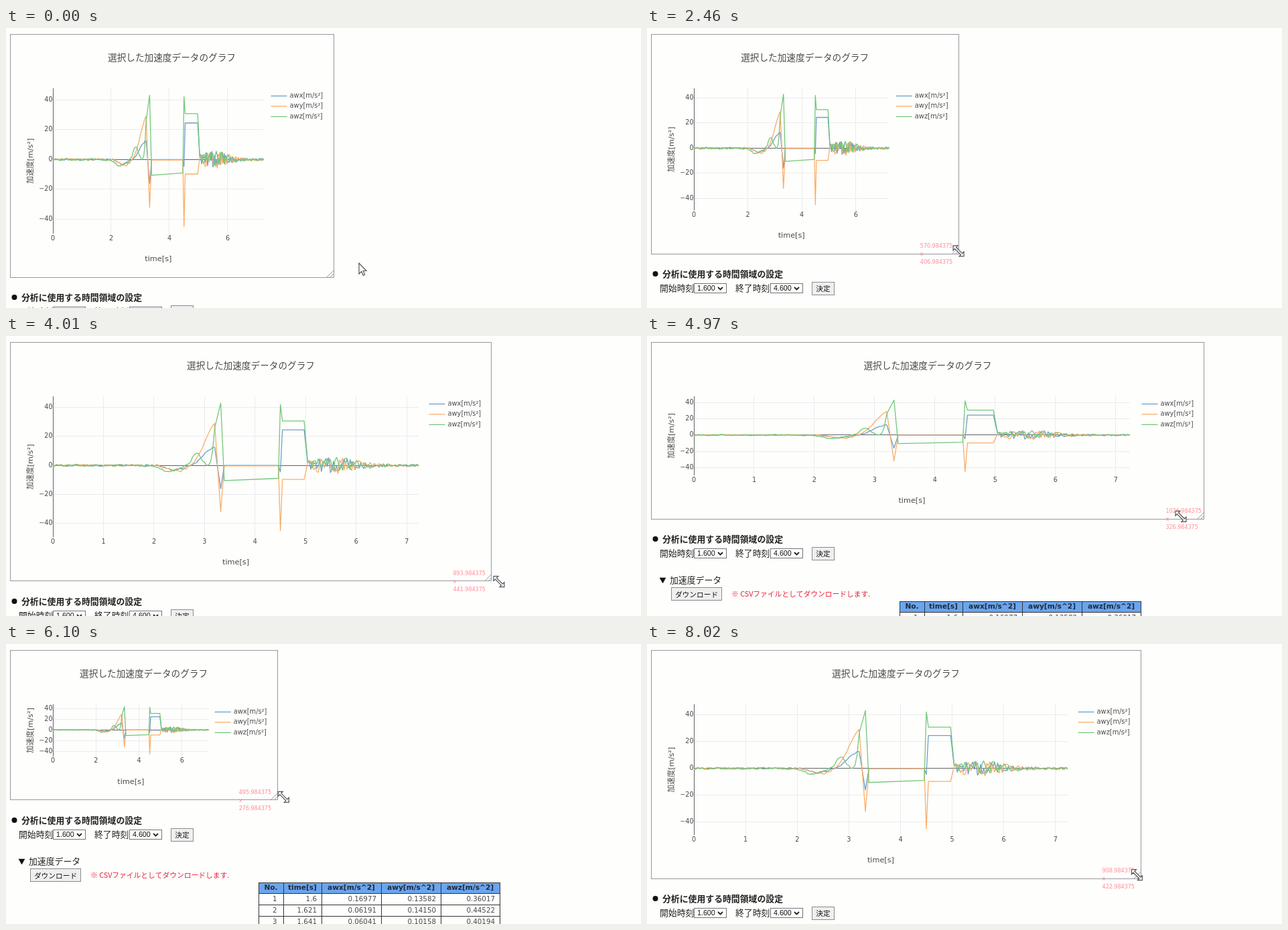
These frames come from a looping animation (948x418 px, 8070 ms). An HTML page with a canvas:

```html
<!DOCTYPE html>
<html lang="ja">
<head>
<meta charset="utf-8">
<title>加速度データ</title>
<style>
html, body { margin: 0; width: 100%; height: 100%; overflow: hidden; background: #fefefc; }
canvas { display: block; }
</style>
</head>
<body>
<canvas id="stage" width="948" height="418"></canvas>
<script>
const ctx = document.getElementById('stage').getContext('2d');
const LOOP = 8070, STEPS = 151;
const GRAB = 17, LEAD = 0.8; // step where the drag begins, steps the pointer runs ahead
const JP = '"Noto Sans CJK JP", "Noto Sans CJK", sans-serif';
const LATIN = '"DejaVu Sans", "Noto Sans CJK JP", sans-serif';
const UI = '"Liberation Sans", "Noto Sans CJK JP", sans-serif';
const INK = '#4a4a4c', GRID = '#ebebf1', EDGE = '#98989f', AXIS = '#626268', PAPER = '#fefefc';
const T_MAX = 7.235, V_TOP = 47.7, V_RANGE = 97.3;

// Turning points of the dragged corner: step, position
const rightTurns = [[GRAB, 489], [46, 465.3], [58, 900], [68, 649.5], [88, 926],
  [107, 343], [136, 797], [151, 736.4]];
const bottomTurns = [[GRAB, 372], [46, 337.4], [58, 390], [68, 331], [82, 400],
  [92, 272.5], [103, 300], [114, 232.9], [138, 385], [151, 349.7]];

const ease = u => (1 - Math.cos(Math.PI * u)) / 2;

function swing(turns, step) {
  if (step <= GRAB) return turns[0][1];
  const i = turns.findIndex(([s]) => s >= step);
  const [s0, v0] = turns[i - 1], [s1, v1] = turns[i];
  return v0 + (v1 - v0) * ease((step - s0) / (s1 - s0));
}

const bump = (x, centre, width) => Math.exp(-(((x - centre) / width) ** 2));

// A slow swell, a crash, a rest, a hit held for a moment, then a rattle
function series(seed, swell, crash, rest, hit, hold) {
  const rand = () => (seed = (seed * 16807) % 2147483647) / 2147483647 * 2 - 1;
  const out = [];
  for (let x = 0; x < 3.2; x += 0.04) out.push([x, swell(x) + rand() * 0.7]);
  out.push([3.2, swell(3.2)], [3.32, crash], [3.39, rest], [4.46, rest * 0.85],
    [4.5, hit], [4.54, hold], [4.97, hold]);
  for (let x = 5.04; x < T_MAX; x += 0.03)
    out.push([x, rand() * (0.8 + 5 * bump(x, 5.55, 0.6))]);
  return out;
}

const curves = [
  { name: 'awx', color: '#6f9fc4',
    points: series(71, x => 12.5 * bump(x, 3.2, 0.28) - 3 * bump(x, 2.4, 0.25), -16, 0, -4.5, 24.5) },
  { name: 'awy', color: '#fbad6a',
    points: series(925, x => 29.7 * bump(x, 3.25, 0.32) - 4 * bump(x, 2.5, 0.25), -32, -0.3, -45, -9.7) },
  { name: 'awz', color: '#74c67a',
    points: series(4403, x => 8.5 * bump(x, 2.84, 0.12) + 29 * bump(x, 3.22, 0.06)
      - 4 * bump(x, 2.3, 0.25), 43, -10.5, 42, 30.7) }
];

const rows = ['0.16977 0.13582 0.36017', '0.06191 0.14150 0.44522', '0.06041 0.10158 0.40194']
  .map((s, i) => [i + 1, +(1.6 + i * 0.0206).toFixed(3), ...s.split(' ')]);

function text(s, x, y, size, { font = LATIN, color = INK, align = 'left', weight = '' } = {}) {
  ctx.font = `${weight} ${size}px ${font}`;
  ctx.fillStyle = color;
  ctx.textAlign = align;
  ctx.textBaseline = 'middle';
  ctx.fillText(s, x, y);
}

function path(points, color, width = 1, fill) {
  ctx.beginPath();
  points.forEach(([x, y]) => ctx.lineTo(x, y));
  if (fill) {
    ctx.closePath();
    ctx.fillStyle = fill;
    ctx.fill();
  }
  ctx.strokeStyle = color;
  ctx.lineWidth = width;
  ctx.stroke();
}

const crisp = v => Math.floor(v) + 0.5;
const hLine = (x0, x1, y, color) => path([[x0, crisp(y)], [x1, crisp(y)]], color);
const vLine = (x, y0, y1, color) => path([[crisp(x), y0], [crisp(x), y1]], color);

function box(x, y, w, h, fill, stroke) {
  ctx.fillStyle = fill;
  ctx.fillRect(x, y, w, h);
  ctx.strokeStyle = stroke;
  ctx.lineWidth = 1;
  ctx.strokeRect(crisp(x), crisp(y), w - 1, h - 1);
}

function drawChart(right, bottom) {
  const left = 70, top = 90, w = (right - 168) / 1.02, h = bottom - 65 - top;
  const px = x => left + x / T_MAX * w;
  const py = v => top + (V_TOP - v) / V_RANGE * h;
  ctx.strokeStyle = EDGE;
  ctx.lineWidth = 1;
  ctx.strokeRect(6.5, 9.5, crisp(right) - 6.5, crisp(bottom) - 9.5);
  text('選択した加速度データのグラフ', (6 + right) / 2, 44, 13.65, { font: JP, align: 'center' });

  const gap = w < 498 ? 2 : 1;
  for (let x = 0; x < T_MAX; x += gap) {
    if (x) vLine(px(x), top, top + h, GRID);
    text(x, px(x), bottom - 58, 9.65, { align: 'center' });
  }
  for (let v = -40; v <= 40; v += 20) {
    if (v) hLine(left, left + w, py(v), GRID);
    text(`${v}`.replace('-', '−'), 69.5, py(v), 9.65, { align: 'right' });
  }
  vLine(left, top, top + h, AXIS);
  hLine(left, left + w, py(0), AXIS);

  ctx.lineJoin = 'round';
  curves.forEach(({ name, color, points }, i) => {
    path(points.map(([x, v]) => [px(x), py(v)]), color, 1.3);
    const x = left + 1.02 * w + 4.5, y = 101.5 + i * 15.4;
    path([[x, y], [x + 24, y]], color, 1.3);
    text(`${name}[m/s²]`, x + 28, y, 9.9);
  });

  text('time[s]', left + w / 2, bottom - 27, 11.25, { align: 'center' });
  ctx.save();
  ctx.translate(37, top + h / 2);
  ctx.rotate(-Math.PI / 2);
  text('加速度[m/s²]', 0, 0, 11.25, { align: 'center' });
  ctx.restore();

  for (const d of [10, 5])
    path([[right - d, bottom], [right, bottom - d]], EDGE);
}

function drawSelect(x, y, value) {
  box(x, y - 7, 49, 15, PAPER, '#74747c');
  text(value, x + 5, y + 1, 10.7, { font: UI, color: '#111' });
  path([[x + 36, y - 1], [x + 39.5, y + 2.5], [x + 43, y - 1]], '#222', 1.8);
}

function drawButton(x, y, w, label) {
  box(x, y - 10, w, 20, '#efefef', '#8c8c90');
  text(label, x + w / 2, y, 10.7, { font: JP, color: '#111', align: 'center' });
}

function drawTable(top) {
  const cols = [377, 414, 471, 560, 649, 737], pitch = 17.3, height = 16 + rows.length * pitch;
  const heads = ['No.', 'time[s]', ...curves.map(c => `${c.name}[m/s^2]`)];
  ctx.fillStyle = '#6aa5ee';
  ctx.fillRect(377, top, 360, 16);
  heads.forEach((s, i) => text(s, (cols[i] + cols[i + 1]) / 2, top + 8, 10.6,
    { weight: 'bold', color: '#222a38', align: 'center' }));
  rows.forEach((row, r) => row.forEach((s, i) =>
    text(s, cols[i + 1] - (i ? 7 : 9.5), top + 25 + r * pitch, 10.3, { align: 'right' })));
  for (let y = 0; y <= height; y += y ? pitch : 16) hLine(377, 738, top + y, '#333338');
  cols.forEach(x => vLine(x, top, top + height, '#333338'));
}

function drawForm(y) {
  const black = { font: JP, color: '#222' };
  ctx.fillStyle = '#111';
  ctx.beginPath();
  ctx.arc(12.5, y + 30, 4, 0, 7);
  ctx.fill();
  text('分析に使用する時間領域の設定', 23, y + 30, 12.86, { ...black, weight: 'bold' });
  text('開始時刻', 19, y + 51, 12.86, black);
  drawSelect(70, y + 51, '1.600');
  text('終了時刻', 132, y + 51, 12.86, black);
  drawSelect(184, y + 51, '4.600');
  drawButton(246, y + 52, 34, '決定');
  path([[19, y + 88], [28, y + 88], [23.5, y + 96]], '#111', 0.5, '#111');
  text('加速度データ', 34, y + 91, 12.86, black);
  drawButton(36, y + 112.5, 76, 'ダウンロード');
  text('※ CSVファイルとしてダウンロードします.', 126, y + 112, 10.75, { font: JP, color: '#e8203c' });
  drawTable(y + 123);
}

function drawSize(right, bottom) {
  const x = right - 57.5, style = { color: '#ff8c98' };
  const label = v => `${Math.round(v)}.984375`;
  text(label(1.244 * (right - 6) - 1.4), x, bottom - 11, 8, style);
  text('x', x, bottom + 1, 8, style);
  text(label(1.244 * (bottom - 9) - 2.5), x, bottom + 13, 8, style);
}

const arrow = [[0, 0], [0, 16], [3.7, 12.5], [6.3, 18.5], [8.7, 17.3], [6.2, 11.5], [11, 11.5]];
const arrowHead = [[-5.5, -3.5], [-8, -1], [-8, -8], [-1, -8], [-3.5, -5.5]];
const resize = [...arrowHead, ...arrowHead.map(([x, y]) => [-x, -y])];

function drawPointer(shape, x, y) {
  ctx.lineJoin = 'miter';
  path(shape.map(([a, b]) => [x + a, y + b]), '#55555a', 1.2, PAPER);
}

function draw(step) {
  const right = swing(rightTurns, step), bottom = swing(bottomTurns, step);
  ctx.fillStyle = PAPER;
  ctx.fillRect(0, 0, 948, 418);
  drawForm(Math.round(bottom));
  drawChart(right, bottom);
  if (step > GRAB) drawSize(right, bottom);
  if (step < 13) {
    const e = ease(step / 13);
    drawPointer(arrow, 527 - 43 * e, 351 + 16 * e);
  } else {
    const ahead = (turns, v) => v - 5 + (swing(turns, step + LEAD) - v);
    drawPointer(resize, ahead(rightTurns, right), ahead(bottomTurns, bottom));
  }
}

const start = performance.now();
function tick() {
  const t = (performance.now() - start) % LOOP;
  draw(Math.min(STEPS - 1, Math.floor((t + 5) / LOOP * STEPS)));
  requestAnimationFrame(tick);
}
tick();
</script>
</body>
</html>
```
